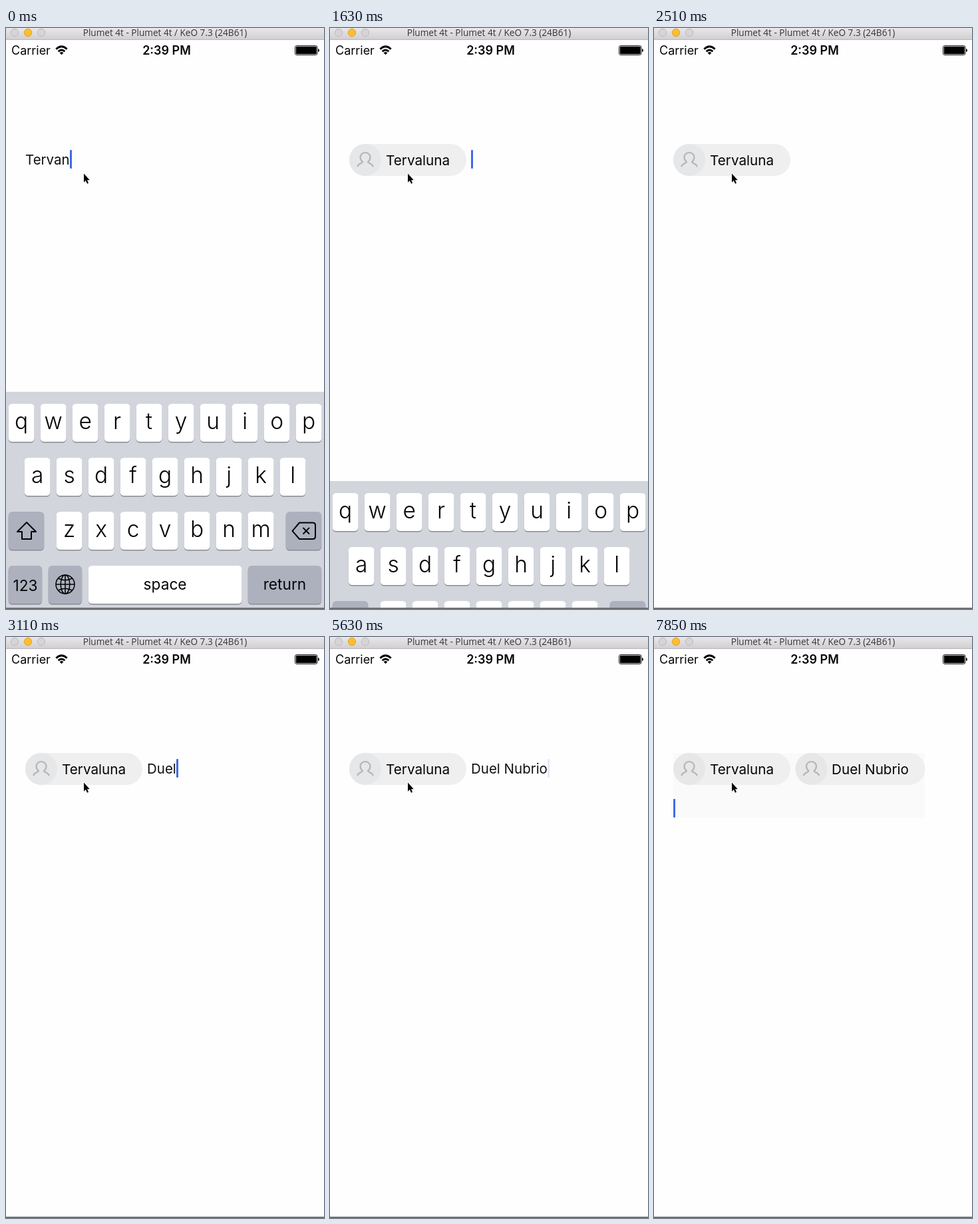
Animation, 478 px wide and 872 px high, one loop 8000 ms. Source, as an HTML page:

```html
<!DOCTYPE html>
<html lang="en">
<head>
<meta charset="utf-8">
<title>Token field</title>
<style>
  html, body { margin: 0; width: 100%; height: 100%; overflow: hidden; background: #fefefe; }
  #stage { position: relative; width: 478px; height: 872px; overflow: hidden; font-family: Inter, sans-serif; }
  svg { position: absolute; left: 0; top: 0; display: block; }
  text { fill: #050505; }
  .title { font: 13.6px "Open Sans", sans-serif; fill: #363436; text-anchor: middle; }
  .status { font-size: 18px; }
  .chip text { font-size: 20.7px; }
  .line { fill: none; stroke: #000; stroke-width: 2; stroke-linejoin: round; }
  .person { fill: none; stroke: #b4b7ba; stroke-width: 2.2; stroke-linecap: round; }
  .key text { text-anchor: middle; }
  .letter { font-size: 33.5px; font-weight: 300; }
  .word { font-size: 22.7px; }
  #field { position: absolute; height: 28px; font-size: 20.5px; line-height: 29px; white-space: pre; color: #111; }
  #caret { display: inline-block; width: 3px; height: 28px; vertical-align: top; border-radius: 1px; background: #4169e8; }
</style>
</head>
<body>
<div id="stage">
  <svg width="478" height="872" viewBox="0 0 478 872">
    <defs>
      <linearGradient id="bar" x2="0" y2="1">
        <stop stop-color="#e9e7e9"/><stop offset="1" stop-color="#d1cfd1"/>
      </linearGradient>
      <path id="person" class="person" d="M-11.5 9.5C-10.5 5-5 5.5-4 3C-6.5 1-7.5-1.5-7.5-4A7.5 7 0 0 1 7.5-4C7.5-1.5 6.5 1 4 3C5 5.5 10.5 5 11.5 9.5"/>
    </defs>

    <rect width="478" height="17" fill="url(#bar)"/>
    <rect y="17" width="478" height="1" fill="#b9b7b9"/>
    <g fill="#d6d4d6" stroke="#bcbabc">
      <circle cx="13" cy="7" r="5.7"/>
      <circle cx="33" cy="7" r="5.7" fill="#fdbd2f" stroke="#e0a32a"/>
      <circle cx="53" cy="7" r="5.7"/>
    </g>
    <text class="title" x="239" y="12">Plumet 4t - Plumet 4t / KeO 7.3 (24B61)</text>

    <text class="status" x="8" y="40">Carrier</text>
    <g fill="none" stroke="#000" stroke-width="2.8">
      <path d="M75.300 31.800Q83.500 23.800 91.700 31.800"/>
      <path d="M78.600 35.300Q83.500 30.600 88.400 35.300"/>
    </g>
    <path d="M83.500 40.300L80.600 37.200Q83.500 34.800 86.400 37.200Z"/>
    <text class="status" x="241.500" y="40" text-anchor="middle" font-weight="600">2:39 PM</text>
    <rect x="434.500" y="26.500" width="33.500" height="14" rx="2.500" fill="none" stroke="#222"/>
    <rect x="435.800" y="27.800" width="31" height="11.400" rx="1.300"/>
    <path d="M469 31q2 .5 2 2.500t-2 2.500z"/>

    <rect id="panel" x="29" y="174" width="378" height="96.500" fill="#fafafa"/>
    <g id="chip1" class="chip">
      <rect x="29" y="174" width="176" height="48" rx="24" fill="#efefef"/>
      <circle id="disc" cx="53" cy="198" r="24"/>
      <use href="#person" x="53" y="198"/>
      <text x="84" y="205.500">Tervaluna</text>
    </g>
    <g id="chip2" class="chip">
      <rect x="212.500" y="174" width="195" height="48" rx="24" fill="#efefef"/>
      <circle cx="236.500" cy="198" r="24" fill="#e7e7e7"/>
      <use href="#person" x="236.500" y="198"/>
      <text x="267" y="205.500">Duel Nubrio</text>
    </g>
  </svg>

  <div id="field"><span id="typed"></span><span id="caret"></span></div>

  <svg width="478" height="872" viewBox="0 0 478 872">
    <path d="M117 218.500V231.700L119.900 229L122 233.700L124 232.800L122 228.200H125.800Z" stroke="#fff" stroke-width="1.400" paint-order="stroke"/>
    <g id="keyboard">
      <rect y="546" width="478" height="326" fill="#d2d5dc"/>
      <g id="keys" class="key"></g>
      <g class="line">
        <path d="M31 742L45 756H38V767H24V756H17Z"/>
        <path d="M441 742.500H461q4 0 4 4V763q0 4-4 4H441L430.500 754.800ZM446.500 750l9.500 9.500M456 750l-9.500 9.500"/>
        <g stroke-width="1.500">
          <circle cx="89" cy="835" r="14"/>
          <ellipse cx="89" cy="835" rx="6.800" ry="14"/>
          <path d="M89 821V849M75 835H103M78.500 826Q89 831.500 99.500 826M78.500 844Q89 838.500 99.500 844"/>
        </g>
      </g>
    </g>
    <rect y="870" width="478" height="2" fill="#707073"/>
  </svg>
</div>

<script>
const $ = id => document.getElementById(id);
const LOOP = 8000, CHIP1 = 1630, CHIP2 = 5780;

function addKey(x, y, w, label, style, fill = '#fff', base = 38) {
  $('keys').insertAdjacentHTML('beforeend',
    `<rect x="${x}" y="${y + 1.5}" width="${w}" height="57" rx="5.5" fill="#898c92"/>
     <rect x="${x}" y="${y}" width="${w}" height="57" rx="5.5" fill="${fill}"/>
     <text class="${style}" x="${x + w / 2}" y="${y + base}">${label}</text>`);
}

[['qwertyuiop', 3.7], ['asdfghjkl', 27.7], ['zxcvbnm', 75.7]].forEach(([row, x], r) =>
  [...row].forEach((c, i) => addKey(x + 48 * i, 564 + 81 * r, 38.8, c, 'letter')));
const grey = '#adb1be';
addKey(3.7, 726, 53.5, '', 'word', grey);
addKey(420.7, 726, 53.5, '', 'word', grey);
addKey(3.7, 807, 50.5, '123', 'word', grey);
addKey(63.7, 807, 50.5, '', 'word', grey);
addKey(123.7, 807, 230.8, 'space', 'word', '#fff', 36);
addKey(363.7, 807, 110.5, 'return', 'word', grey, 36);

// [start, value] lists; each value holds until the next start
const typing = [
  [0, 'Tervan'], [300, 'Terva'], [450, 'Terval'], [740, 'Tervalu'], [890, 'Tervalun'], [1040, 'Tervaluna'],
  [CHIP1, ''], [2660, 'D'], [2810, 'Due'], [3110, 'Duel'], [3550, 'Duel '], [3850, 'Duel N'],
  [4150, 'Duel Nu'], [4440, 'Duel Nub'], [4740, 'Duel Nubr'], [4890, 'Duel Nubri'], [5030, 'Duel Nubrio'],
  [CHIP2, '']
];
const blink = [
  [0, 1], [2220, .6], [2370, .12], [2510, 0], [2660, 1], [5630, .15], [CHIP2, 1],
  [6370, .5], [6520, 0], [6820, 1], [7250, .5], [7400, 0], [7700, .5], [7850, 1]
];
const at = (list, t) => list.filter(([start]) => start <= t).pop()[1];

// critically damped slide, moving in coarse time steps
function slide(t) {
  if (t < CHIP1) return 0;
  const k = 1.42 + 2.15 * Math.floor((t - CHIP1) / 147.5);
  return k > 9 ? 326 : Math.round(324 * (1 - Math.exp(-k) * (1 + k)));
}

const show = (id, on) => { $(id).style.display = on ? '' : 'none'; };

function draw() {
  const t = performance.now() % LOOP;
  const one = t >= CHIP1, two = t >= CHIP2;
  show('chip1', one);
  show('chip2', two);
  show('panel', two);
  $('disc').setAttribute('fill', two ? '#e7e7e7' : '#e5e7e9');
  const text = at(typing, t);
  if ($('typed').textContent !== text) $('typed').textContent = text;
  $('caret').style.opacity = at(blink, t);
  $('field').style.left = (one && !two ? 212 : 29) + 'px';
  $('field').style.top = (two ? 243 : 183) + 'px';
  $('keyboard').setAttribute('transform', `translate(0 ${slide(t)})`);
  requestAnimationFrame(draw);
}
draw();
</script>
</body>
</html>
```
